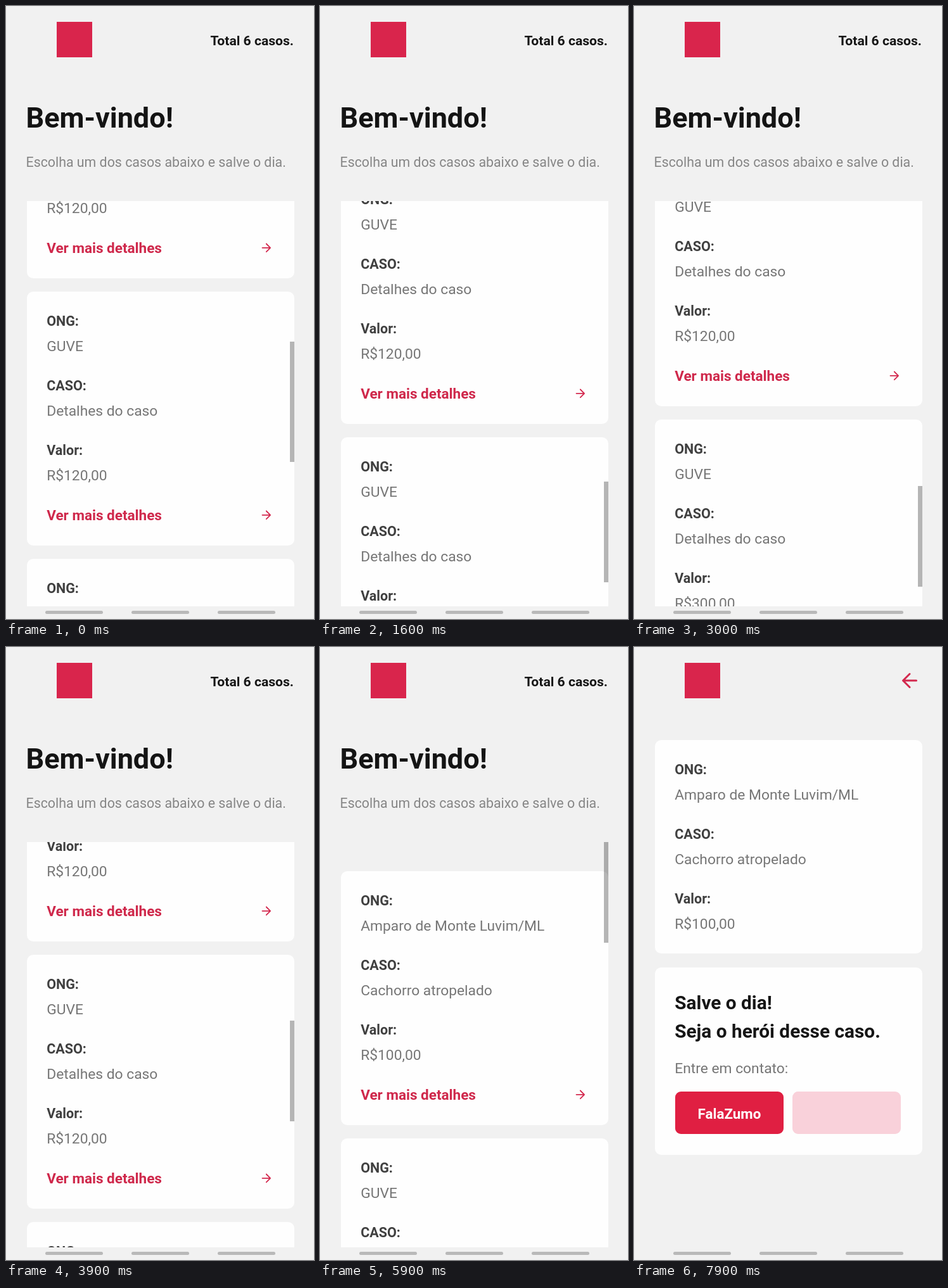
Recreate the animation shown at these times as an HTML page. Size 486x968 px, loop 8 s.

```html
<!DOCTYPE html>
<html lang="pt-BR">
<head>
<meta charset="utf-8">
<title>Casos</title>
<style>
  html, body { margin: 0; width: 100%; height: 100%; overflow: hidden; background: #f1f1f1; }
  body { position: relative; font-family: Roboto, Inter, sans-serif; }
  #stage { position: absolute; left: 0; top: 0; width: 486px; height: 968px; overflow: hidden; }
  #stage div, #stage span, #stage svg { position: absolute; }

  /* every line of text is centred vertically on its top value */
  span { line-height: 0; white-space: nowrap; }
  .screen { inset: 0; background: #f1f1f1; }
  .logo { left: 80px; top: 25px; width: 56px; height: 56px; background: #d9254c; }
  .total { right: 32px; top: 55px; font-size: 21.1px; font-weight: 700; color: #161616; }
  .title { left: 31.5px; top: 177px; font-size: 45px; font-weight: 700; color: #141414; }
  .intro { left: 31.5px; top: 247px; font-size: 21.35px; color: #868686; }

  .list { left: 0; top: 308px; width: 486px; height: 640px; overflow: hidden; }
  #cards { left: 0; top: 0; }
  .card { left: 33px; width: 422px; background: #fefefe; border-radius: 10px; }
  .card span { left: 31.2px; }
  .label { font-size: 21.5px; font-weight: 700; color: #404040; }
  .value { font-size: 22.8px; color: #767676; }
  .more { font-size: 22.5px; font-weight: 700; color: #cf284b; }
  .call { font-size: 29.8px; font-weight: 700; color: #161616; }
  #thumb { left: 448px; width: 7px; background: rgba(0, 0, 0, .29); }

  svg { fill: none; stroke: #d3294e; stroke-width: 2; stroke-linecap: round; stroke-linejoin: round; }
  .next { left: 366.7px; top: 342px; width: 21.6px; height: 21.6px; }
  .back { left: 416.5px; top: 35px; width: 36px; height: 36px; }
  .button { top: 196px; width: 171px; height: 67px; border-radius: 9px; background: #e01f42; }
  .card .button span { left: 0; width: 100%; top: 35px; text-align: center; font-size: 22.4px; font-weight: 700; color: #fff; }
  .pressed { background: #f9d1da; }
  .nav { top: 955px; width: 91px; height: 5px; border-radius: 2.5px; background: #b9b9b9; }
</style>
</head>
<body>
<div id="stage">
  <div class="screen">
    <div class="logo"></div>
    <span class="total">Total 6 casos.</span>
    <span class="title">Bem-vindo!</span>
    <span class="intro">Escolha um dos casos abaixo e salve o dia.</span>
    <div class="list">
      <div id="cards"></div>
      <div id="thumb"></div>
    </div>
  </div>

  <div class="screen" id="detail">
    <div class="logo"></div>
    <svg class="back" viewBox="0 0 24 24"><path d="M19 12H5M12 19l-7-7 7-7"/></svg>
    <div class="card" id="summary" style="top:147px;height:337px"></div>
    <div class="card" style="top:506px;height:296px">
      <span class="call" style="top:56px">Salve o dia!</span>
      <span class="call" style="top:101px">Seja o herói desse caso.</span>
      <span class="value" style="top:160px">Entre em contato:</span>
      <div class="button" style="left:32px"><span>FalaZumo</span></div>
      <div class="button pressed" style="left:217px"></div>
    </div>
  </div>

  <div class="nav" style="left:62px"></div>
  <div class="nav" style="left:198px"></div>
  <div class="nav" style="left:333.5px"></div>
</div>

<script>
  const LOOP = 8000, STEP = 100;
  const VIEW = 640, PITCH = 422, PAD = 46, CARD_HEIGHT = 401;
  const LOADED_AT = 700, OPEN_AT = 6200, OPEN_TIME = 300;

  // time in ms, scroll offset in px
  const path = [
    [0, 747], [700, 1330], [1600, 1783], [2100, 1937], [2600, 1937],
    [3000, 1811], [3900, 1134], [5100, 338], [5700, 0], [8000, 0]
  ];

  const first = ['Amparo de Monte Luvim/ML', 'Cachorro atropelado', 'R$100,00'];
  const common = ['GUVE', 'Detalhes do caso', 'R$120,00'];
  const last = ['GUVE', 'Detalhes do caso', 'R$300,00'];
  const cases = [first, common, common, common, common, last];

  const $ = id => document.getElementById(id);
  const line = (kind, top, text) => `<span class="${kind}" style="top:${top}px">${text}</span>`;
  const fields = values => ['ONG:', 'CASO:', 'Valor:'].map((name, i) =>
    line('label', 47 + 102 * i, name) + line('value', 87 + 102 * i, values[i])).join('');
  const next = '<svg class="next" viewBox="0 0 24 24"><path d="M5 12h14M12 5l7 7-7 7"/></svg>';

  $('summary').innerHTML = fields(first);
  $('cards').innerHTML = cases.map((values, i) =>
    `<div class="card" style="top:${PAD + PITCH * i}px;height:${CARD_HEIGHT}px">` +
    fields(values) + line('more', 353, 'Ver mais detalhes') + next + '</div>').join('');

  const slope = i => path[i] && path[i + 1]
    ? (path[i + 1][1] - path[i][1]) / (path[i + 1][0] - path[i][0]) : 0;

  // harmonic mean keeps the curve from overshooting
  function tangent(i) {
    if (i === 0) return slope(0);
    const a = slope(i - 1), b = slope(i);
    return a * b > 0 ? 2 * a * b / (a + b) : 0;
  }

  function scrollAt(t) {
    let i = 0;
    while (i < path.length - 2 && t >= path[i + 1][0]) i++;
    const [t0, s0] = path[i], [t1, s1] = path[i + 1];
    const d = t1 - t0, u = (t - t0) / d, v = 1 - u;
    return s0 * v * v * (1 + 2 * u) + s1 * u * u * (3 - 2 * u)
      + d * u * v * (tangent(i) * v - tangent(i + 1) * u);
  }

  function draw(t) {
    const scroll = scrollAt(t);
    const content = PAD - 1 + PITCH * (t < LOADED_AT ? 5 : 6);
    $('cards').style.transform = `translateY(${-scroll}px)`;
    $('thumb').style.top = scroll / content * VIEW + 'px';
    $('thumb').style.height = VIEW * VIEW / content + 'px';

    const p = Math.min(1, Math.max(0, (t - OPEN_AT) / OPEN_TIME));
    const open = 1 - (1 - p) ** 3;
    $('detail').style.opacity = open;
    $('detail').style.transform = `translateY(${(1 - open) * 77}px)`;
  }

  function tick() {
    const t = performance.now() % LOOP;
    draw(Math.floor(t / STEP) * STEP);
    requestAnimationFrame(tick);
  }
  tick();
</script>
</body>
</html>
```
